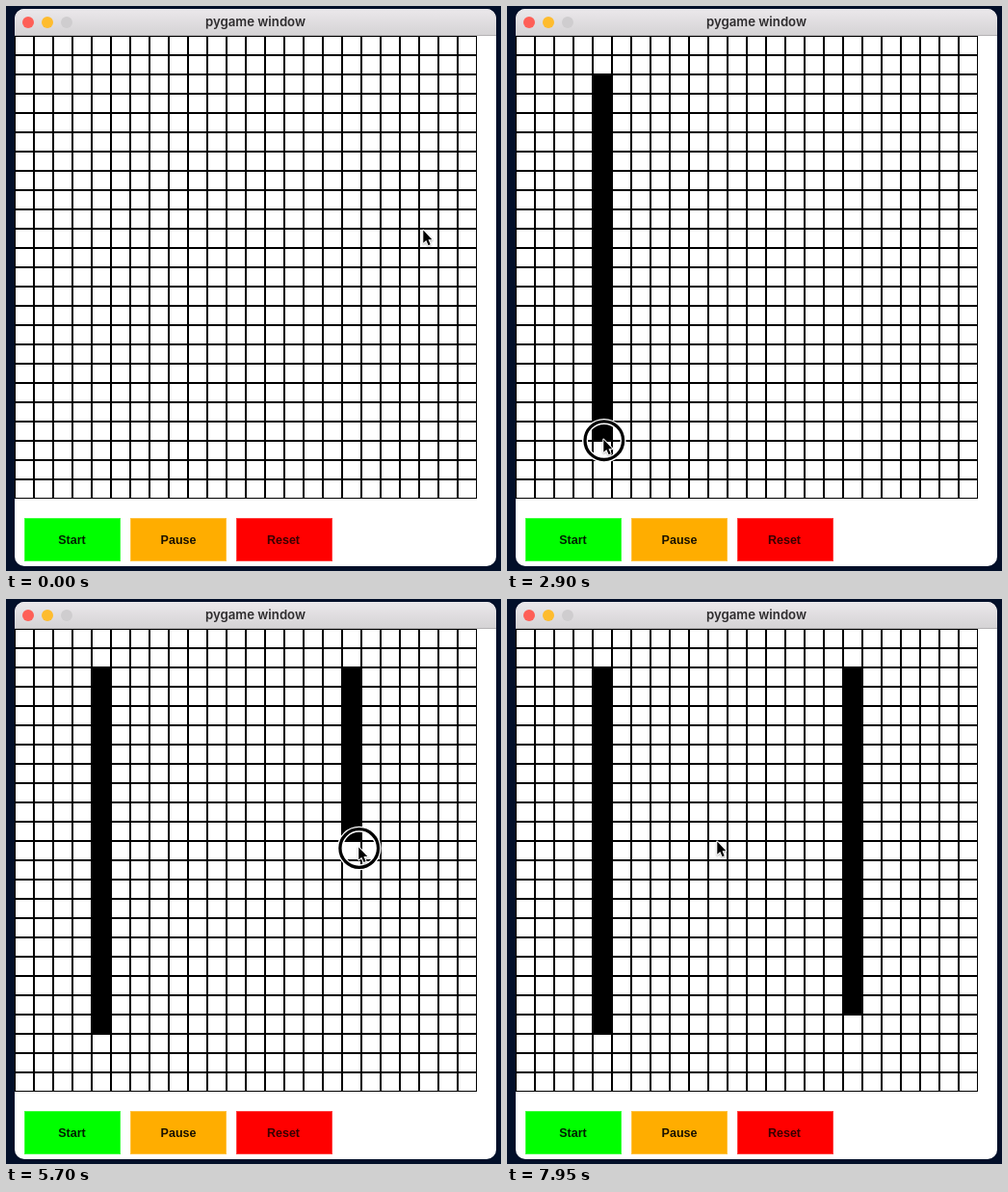
An HTML page with a canvas that plays this animation: 514x586 px, repeating every 8 s.

```html
<!DOCTYPE html>
<html lang="en">
<head>
<meta charset="utf-8">
<title>Grid drawing</title>
<style>
  html, body { margin: 0; width: 100%; height: 100%; overflow: hidden; background: #020f29; }
  canvas { display: block; }
</style>
</head>
<body>
<canvas id="stage" width="514" height="586"></canvas>
<script>
const ctx = document.getElementById('stage').getContext('2d');
const LOOP = 8000, CELL = 20, COUNT = 24, LEFT = 9, TOP = 31;
const FIRST_ROW = 2, PAINT_LAG = 8;

// Each move eases the pointer from where it rests; bow bends it sideways
const home = { x: 433, y: 232 };
const moves = [
  { from: 0, to: 950, x: 98, y: 78 },
  { from: 1000, to: 2840, x: 100, y: 449 },
  { from: 2950, to: 3300, x: 450, y: 230 },
  { from: 3300, to: 4250, x: 361, y: 78 },
  { from: 4650, to: 6710, x: 357, y: 425, bow: 7 },
  { from: 7020, to: 7100, x: 338, y: 392 },
  { from: 7250, to: 7950, x: 218, y: 251 }
];
const strokes = [
  { col: 4, from: 1100, to: 2950 },
  { col: 17, from: 4650, to: 6750 }
];
const buttons = [
  { label: 'Start', color: '#00ff00', ink: '#002000', shift: -0.5 },
  { label: 'Pause', color: '#ffad00', ink: '#1a1100', shift: 0 },
  { label: 'Reset', color: '#ff0000', ink: '#380000', shift: -1 }
];
const lights = ['#fe5f57', '#febc2e', '#cfcdcf'];

const smooth = s => s * s * (3 - 2 * s);

function pointerAt(t) {
  let { x, y } = home;
  for (const m of moves) {
    if (t < m.from) break;
    const e = smooth(Math.min(1, (t - m.from) / (m.to - m.from)));
    x += (m.x - x) * e + (m.bow || 0) * Math.sin(Math.PI * e);
    y += (m.y - y) * e;
  }
  return { x, y };
}

function drawText(text, x, y, font, color) {
  ctx.font = font;
  ctx.fillStyle = color;
  ctx.textAlign = 'center';
  ctx.fillText(text, x, y);
}

function drawTitleBar() {
  const bar = ctx.createLinearGradient(0, 3, 0, 30);
  bar.addColorStop(0, '#ebe8eb');
  bar.addColorStop(1, '#d5d3d5');
  ctx.fillStyle = bar;
  ctx.fillRect(9, 3, 500, 27);
  ctx.fillStyle = '#b4b2b4';
  ctx.fillRect(9, 30, 500, 1);
  lights.forEach((color, i) => {
    ctx.beginPath();
    ctx.arc(23 + i * 20, 17, 6, 0, Math.PI * 2);
    ctx.fillStyle = color;
    ctx.fill();
  });
  drawText('pygame window', 259, 21, '600 13.2px Inter, sans-serif', '#2d2b2d');
}

function drawButton({ label, color, ink, shift }, i) {
  const x = 19 + i * 110;
  ctx.fillStyle = color;
  ctx.fillRect(x, 531, 100, 45);
  ctx.strokeStyle = 'rgba(255,255,255,.25)';
  ctx.lineWidth = 1;
  ctx.strokeRect(x + 0.5, 531.5, 99, 44);
  drawText(label, x + 50 + shift, 558, 'bold 12.5px "Liberation Sans", sans-serif', ink);
}

function drawWindow() {
  ctx.fillStyle = '#020f29';
  ctx.fillRect(0, 0, 514, 586);
  ctx.save();
  ctx.beginPath();
  ctx.roundRect(9, 3, 500, 578, 10);
  ctx.clip();
  ctx.fillStyle = '#fff';
  ctx.fillRect(9, 3, 500, 578);
  drawTitleBar();
  buttons.forEach(drawButton);
  ctx.restore();
}

function drawGrid() {
  ctx.strokeStyle = '#000';
  ctx.lineWidth = 1;
  for (let r = 0; r < COUNT; r++)
    for (let c = 0; c < COUNT; c++)
      ctx.strokeRect(LEFT + c * CELL + 0.5, TOP + r * CELL + 0.5, CELL - 1, CELL - 1);
}

function drawStroke({ col, from, to }, t) {
  if (t < from) return;
  const { y } = pointerAt(Math.min(t, to));
  const rows = Math.floor((y - PAINT_LAG - TOP) / CELL) - FIRST_ROW + 1;
  ctx.fillStyle = '#000';
  ctx.fillRect(LEFT + col * CELL, TOP + FIRST_ROW * CELL, CELL, Math.max(1, rows) * CELL);
}

function drawRing(x, y) {
  for (const [color, width] of [['#fff', 6], ['#000', 3.3]]) {
    ctx.beginPath();
    ctx.arc(x, y, 19.8, 0, Math.PI * 2);
    ctx.strokeStyle = color;
    ctx.lineWidth = width;
    ctx.stroke();
  }
}

const arrow = new Path2D('M.3 .6V13.8L3.3 11L5.6 16.2L7.7 15.3L5.5 10.2H9.4Z');

function drawPointer(x, y) {
  ctx.save();
  ctx.translate(x, y);
  ctx.shadowColor = 'rgba(0,0,0,.3)';
  ctx.shadowBlur = 2;
  ctx.shadowOffsetY = 1;
  ctx.strokeStyle = '#fff';
  ctx.lineWidth = 2;
  ctx.lineJoin = 'round';
  ctx.stroke(arrow);
  ctx.shadowColor = 'transparent';
  ctx.fillStyle = '#000';
  ctx.fill(arrow);
  ctx.restore();
}

function draw(t) {
  drawWindow();
  drawGrid();
  for (const s of strokes) drawStroke(s, t);
  const { x, y } = pointerAt(t);
  if (strokes.some(s => t >= s.from && t < s.to)) drawRing(x + 0.8, y + 1.7);
  drawPointer(x, y);
}

const start = performance.now();
function tick() {
  draw((performance.now() - start) % LOOP);
  requestAnimationFrame(tick);
}
tick();
</script>
</body>
</html>
```
